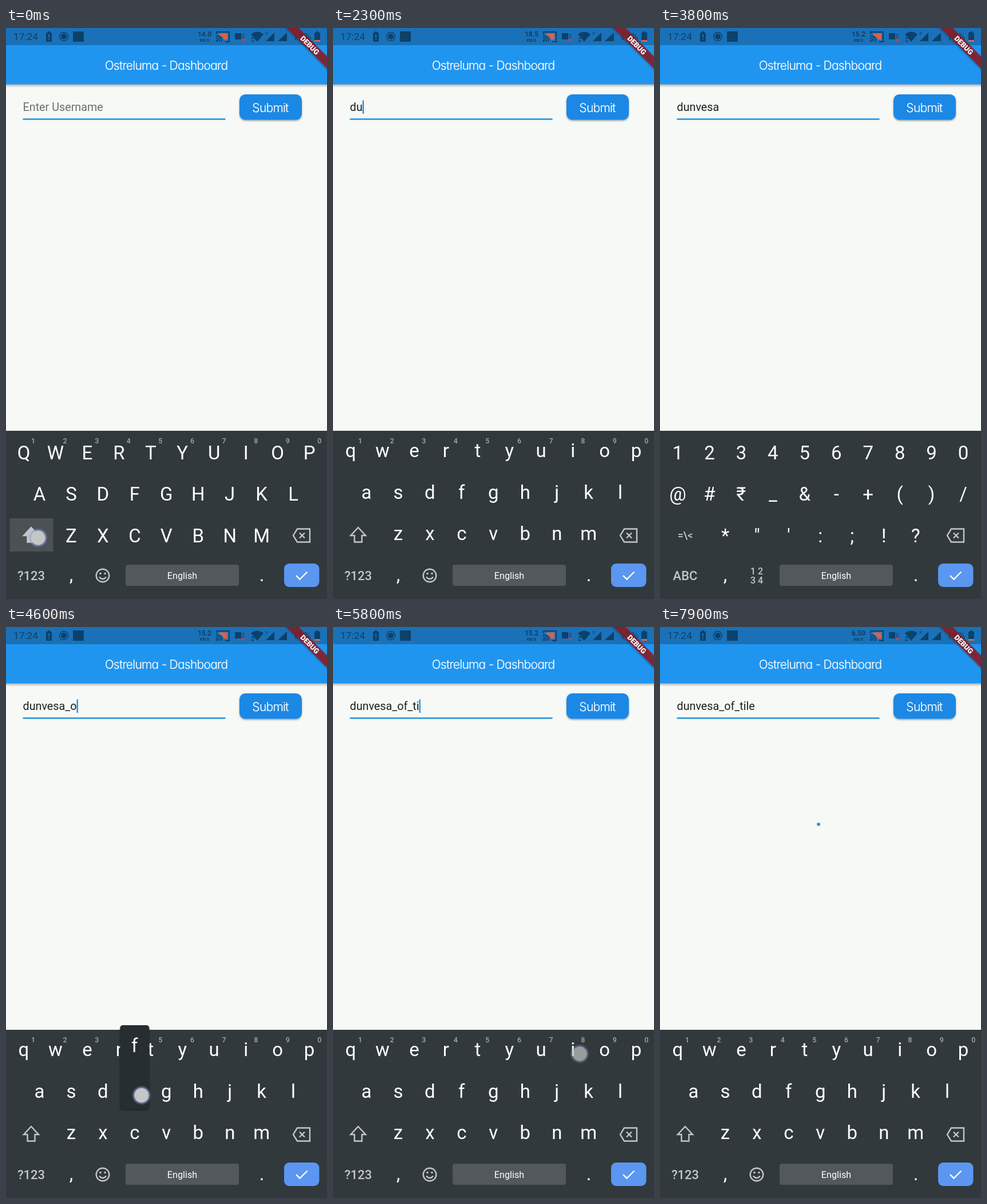
These frames come from a looping animation (561x998 px, 8000 ms). An HTML page:

```html
<!DOCTYPE html>
<html lang="en">
<head>
<meta charset="utf-8">
<style>
html, body { margin: 0; height: 100%; overflow: hidden; background: #f6f9f6; }
svg { display: block; width: 100vw; height: 100vh; font-family: Roboto, sans-serif; white-space: pre; }
.mid { text-anchor: middle; }
.head { font: 300 21px Inter, sans-serif; font-feature-settings: "cv11"; letter-spacing: -.75px; fill: #fff; stroke: #fff; stroke-width: .2px; text-anchor: middle; }
.field { font-size: 19.75px; }
.key { font-size: 33px; fill: #fff; text-anchor: middle; }
.hint { font-size: 12.5px; font-weight: 500; fill: #a3a8aa; text-anchor: middle; }
.mode { font-size: 22px; font-weight: 500; fill: #c3c7c8; text-anchor: middle; }
.icon { fill: none; stroke: #c3c7c8; stroke-width: 2.4; }
.dim { fill: #0c416b; }
</style>
</head>
<body>
<svg viewBox="0 0 561 998" preserveAspectRatio="none">
  <defs>
    <filter id="soft" x="-30%" y="-30%" width="160%" height="180%">
      <feDropShadow dx="0" dy="1.5" stdDeviation="1.6" flood-opacity=".4"/>
    </filter>
    <linearGradient id="fade" x2="0" y2="1">
      <stop stop-color="#000" stop-opacity=".3"/><stop offset="1" stop-color="#000" stop-opacity="0"/>
    </linearGradient>
    <radialGradient id="glow">
      <stop offset=".7" stop-color="#8d9cd0" stop-opacity=".9"/><stop offset="1" stop-color="#8d9cd0" stop-opacity="0"/>
    </radialGradient>
  </defs>

  <rect width="561" height="998" fill="#f6f9f6"/>
  <rect y="98" width="561" height="6" fill="url(#fade)"/>
  <rect width="561" height="98.500" fill="#2095f0"/>
  <rect width="561" height="30" fill="#1a71b7"/>
  <text class="head" x="280" y="73">Ostreluma - Dashboard</text>

  <!-- status bar -->
  <g class="dim">
    <text x="13" y="21" font-size="17.300">17:24</text>
    <path d="M70 8h3v-2h4v2h3v16h-10z"/>
    <path d="M75 11v6M75 19v2" stroke="#1a71b7" stroke-width="2"/>
    <circle cx="101" cy="15" r="7.500" fill="none" stroke="#0c416b" stroke-width="1.400"/>
    <circle cx="101" cy="15" r="5"/>
    <rect x="117" y="6" width="19" height="18"/>
    <text id="speed" class="mid" x="347" y="15" font-size="12" font-weight="700"></text>
    <text class="mid" x="347" y="23.500" font-size="7.500" font-weight="700">KB/S</text>
    <path d="M373 9.500h14v11h-6q-2-6-8-8z" fill="#d9624a"/>
    <path d="M368 11v-4h22v17h-7M367 14q10 0 10 10M367 18q6 0 6 6" fill="none" stroke="#0c416b" stroke-width="1.900"/>
    <circle cx="368.500" cy="22.500" r="1.800"/>
    <rect x="400" y="9" width="11" height="11"/>
    <rect x="412" y="10" width="5" height="13" opacity=".35"/>
    <rect x="412" y="19" width="5" height="4" fill="#c2414f"/>
    <path d="M428 11q11-9 22 0l-11 13z"/>
    <path d="M428 17l3 3 3-3zM428 22l3 3 3-3z"/>
    <text x="453" y="12" font-size="8">X</text>
    <path d="M469 8v15h-15z"/>
    <path d="M491 8v15h-16z"/>
    <text x="501" y="21" font-size="17.300">11%</text>
    <path d="M539 8h3v-2h4v2h3v13h-10z"/>
    <rect x="539" y="21" width="10" height="3" fill="#d9624a"/>
  </g>

  <!-- form -->
  <rect x="29.500" y="158" width="354" height="2.600" fill="#2c94dc"/>
  <text id="hint" class="field" x="29.500" y="145" fill="#6c6f6d">Enter Username</text>
  <text id="value" class="field" x="29.500" y="145" fill="#1f2120"></text>
  <rect id="cursor" y="126.500" width="2.500" height="23.500" fill="#2c94dc"/>
  <rect x="408" y="116" width="109" height="44.500" rx="10.500" fill="#1e88e5" filter="url(#soft)"/>
  <text class="head" x="462" y="147">Submit</text>
  <path id="spinner" fill="none" stroke="#2095f0" stroke-width="5" stroke-linecap="square"/>

  <!-- keyboard -->
  <rect y="704" width="561" height="294" fill="#31393c"/>
  <rect id="press" width="76" height="58" fill="#4b5154"/>
  <g id="hints"></g>
  <g id="upper"></g>
  <g id="lower"></g>
  <g id="symbols"></g>
  <path id="shift" class="icon" d="M44 873l13 14h-6.500v11.500h-13v-11.500h-6.500z"/>
  <path class="icon" d="M502 887l7-11.500h22v23h-22zM513 882.500l9 9m0-9l-9 9"/>
  <text id="mode" class="mode" x="44" y="965"></text>
  <text class="key" x="114" y="967" font-size="28">,</text>
  <text class="key" x="447" y="967" font-size="28">.</text>
  <g id="smile">
    <circle class="icon" cx="169" cy="957" r="11.300" stroke-width="2"/>
    <path class="icon" d="M163 959.500q6 7 12 0" stroke-width="2"/>
    <circle cx="165" cy="953.500" r="1.800" fill="#c3c7c8"/>
    <circle cx="173" cy="953.500" r="1.800" fill="#c3c7c8"/>
  </g>
  <rect x="209" y="938" width="198" height="37" rx="4" fill="#52585b"/>
  <text class="mid" x="308" y="963" font-size="16.200" fill="#fff">English</text>
  <rect x="486" y="936" width="61.500" height="41" rx="9" fill="#5b96f0"/>
  <path d="M507 957l6.500 6.500 13-13" fill="none" stroke="#fff" stroke-width="2.400"/>
  <g id="popup">
    <rect x="-25.500" y="-126.500" width="51" height="147" rx="5" fill="#262d30" filter="url(#soft)"/>
    <text id="label" class="key" y="-79.500"></text>
  </g>
  <g id="dot">
    <circle r="17" fill="url(#glow)"/>
    <circle r="12.500" fill="#c6c6c6"/>
  </g>

  <!-- corner ribbon -->
  <g transform="translate(561 0) rotate(45)">
    <rect x="-60" y="34.900" width="120" height="15" fill="#8d1a22" fill-opacity=".82" filter="url(#soft)"/>
    <text class="mid" y="47" font-size="12.700" font-weight="900" fill="#fff">DEBUG</text>
  </g>
</svg>
<script>
const LOOP = 8000, HOLD = 100, FADE = 100, BLINK = 500, PITCH = 55.45;
const el = Object.fromEntries([...document.querySelectorAll('[id]')].map(e => [e.id, e]));
const show = (e, on) => e.setAttribute('visibility', on ? 'visible' : 'hidden');

// Where each key sits: x centre, text baseline
const spots = {
  shift: [44, 895], back: [517, 895], sym: [44, 965], abc: [44, 965], submit: [462, 146]
};

function addText(group, cls, x, y, text) {
  const t = document.createElementNS('http://www.w3.org/2000/svg', 'text');
  t.setAttribute('class', cls);
  t.setAttribute('x', x);
  t.setAttribute('y', y);
  t.textContent = text;
  group.append(t);
  return t;
}

function addRows(group, rows, top, starts) {
  rows.forEach((row, r) => [...row].forEach((ch, i) => {
    const x = starts[r] + PITCH * i, y = top + 72.5 * r;
    spots[ch] = [x, y];
    addText(group, 'key', x, y, ch);
  }));
}

const letters = ['qwertyuiop', 'asdfghjkl', 'zxcvbnm'];
addRows(el.lower, letters, 750, [31, 58.5, 114]);
addRows(el.upper, letters.map(r => r.toUpperCase()), 753.5, [31, 58.5, 114]);
addRows(el.symbols, ['1234567890', '@#₹_&-+()/', '*"\':;!?'], 753.5, [31, 31, 114]);
[...'1234567890'].forEach((n, i) => addText(el.hints, 'hint', 47.5 + 55.6 * i, 726, n));
addText(el.symbols, 'mode', 44, 893, '=\\<').style.fontSize = '18px';
['1 2', '3 4'].forEach((s, i) =>
  addText(el.symbols, 'mode', 169, 955 + 15.5 * i, s).style.fontSize = '16px');

// Press time and key; a key takes effect when released
const taps = [
  [-40, 'shift'], [400, 'D'], [680, 'u'], [1250, 'back'], [1550, 'back'],
  [1850, 'd'], [2050, 'u'], [2400, 'n'], [2600, 'v'], [2800, 'e'], [2960, 's'], [3130, 'a'],
  [3480, 'sym'], [3900, '_'], [4180, 'abc'], [4420, 'o'], [4560, 'f'],
  [4900, 'sym'], [5120, '_'], [5400, 'abc'], [5510, 't'], [5680, 'i'], [5900, 'l'], [6150, 'e'],
  [7400, 'submit']
];

function stateAt(t) {
  const s = { text: '', layout: 'upper', edited: -BLINK };
  for (const [start, key] of taps) {
    if (start > t) break;
    s.tap = { key, age: t - start };
    if (t < start + HOLD) break;
    if (key === 'sym') s.layout = 'symbols';
    else if (key === 'abc') s.layout = 'lower';
    else if (key === 'back' || key.length === 1) {
      s.text = key === 'back' ? s.text.slice(0, -1) : s.text + key;
      s.edited = start + HOLD;
      if (s.layout === 'upper') s.layout = 'lower';
    }
  }
  return s;
}

function drawTouch({ key, age }) {
  const [x, y] = spots[key], held = age < HOLD;
  const wide = ['shift', 'back', 'sym', 'abc'].includes(key);
  show(el.press, held && wide);
  el.press.setAttribute('x', x - 37.5);
  el.press.setAttribute('y', y - 38);
  show(el.popup, held && key.length === 1);
  el.popup.setAttribute('transform', `translate(${x} ${y})`);
  el.label.textContent = key.length === 1 ? key : '';
  el.dot.setAttribute('transform', `translate(${x + 12} ${y - 4})`);
  el.dot.setAttribute('opacity', held ? 1 : Math.max(0, 1 - 1.6 * (age - HOLD) / FADE * .9));
}

function drawSpinner(t) {
  const age = t - 7850;
  show(el.spinner, age >= 0);
  const from = (-101 + age * .03) * Math.PI / 180;
  const to = from + .01 + .000006 * Math.max(0, age) ** 2;
  const at = a => `${280.5 + 22.4 * Math.cos(a)} ${367 + 22.4 * Math.sin(a)}`;
  el.spinner.setAttribute('d', `M${at(from)}A22.4 22.4 0 0 1 ${at(to)}`);
}

function draw(t) {
  const s = stateAt(t);
  el.speed.textContent = ['14.0', '18.5', '15.2', '6.50'][Math.floor((t + 2500) / 3000)];
  el.value.textContent = s.text;
  show(el.hint, !s.text);
  show(el.cursor, Math.floor((t - s.edited) / BLINK) % 2 === 0);
  el.cursor.setAttribute('x', 29.5 + (s.text ? el.value.getComputedTextLength() : 0));
  for (const name of ['upper', 'lower', 'symbols']) show(el[name], s.layout === name);
  const sym = s.layout === 'symbols';
  for (const name of ['hints', 'shift', 'smile']) show(el[name], !sym);
  el.shift.style.fill = s.layout === 'upper' ? '#c3c7c8' : 'none';
  el.mode.textContent = sym ? 'ABC' : '?123';
  drawTouch(s.tap);
  drawSpinner(t);
}

const begin = performance.now();
function tick() {
  draw((performance.now() - begin) % LOOP);
  requestAnimationFrame(tick);
}
tick();
</script>
</body>
</html>
```
